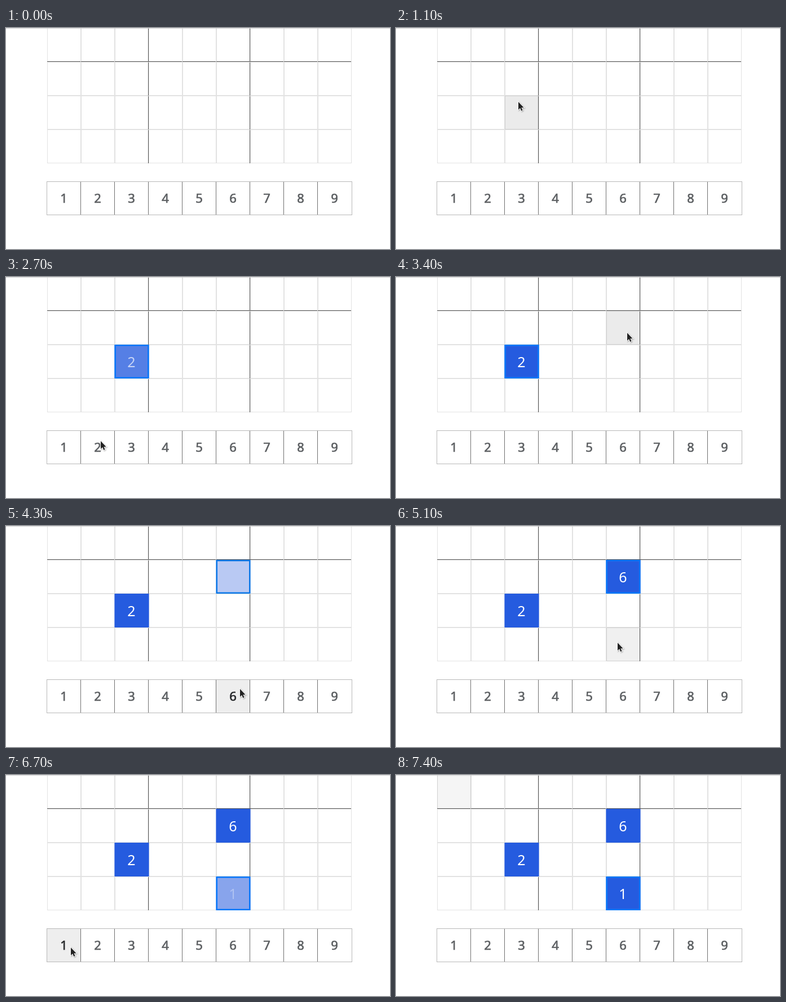
An HTML page with a canvas for the animation above (7800 ms loop, 681 by 392 pixels).

```html
<!DOCTYPE html>
<html lang="en">
<head>
<meta charset="utf-8">
<title>Number grid</title>
<style>
  html, body { margin: 0; width: 100%; height: 100%; overflow: hidden; background: #fff; }
  canvas { display: block; }
</style>
</head>
<body>
<canvas id="stage" width="681" height="392"></canvas>
<script>
const ctx = document.getElementById("stage").getContext("2d");
const LOOP = 7800, TICK = 100, SIZE = 60, LEFT = 73, PAD_TOP = 272;
const ENTER = 600, LEAVE = 7400;
const FONT = '"Noto Sans", "Open Sans", sans-serif';
const DARK = "#555", LIGHT = "#e2e2e2";
const SHADES = ["#f5f5f5", "#ebebeb", "#ebebeb", "#f0f0f0"];

// The pointer glides from stop to stop, some glides bowed sideways or down
const HOME = { x: 300, y: 0 };
const GLIDES = [
  { from: ENTER, to: 1100, x: 217, y: 130 },
  { from: 1400, to: 1700, x: 204, y: 156 },
  { from: 1800, to: 2100, x: 168, y: 290 },
  { from: 2700, to: 3400, x: 410, y: 98 },
  { from: 3700, to: 4400, x: 413, y: 293, bowX: 32 },
  { from: 4700, to: 5100, x: 393, y: 206 },
  { from: 5730, to: 6500, x: 115, y: 305, bowY: 38 },
  { from: 6800, to: LEAVE, x: 110, y: 0 }
];

const ENTRIES = [
  { digit: 2, col: 2, row: 2, focus: 1400, fill: 2600 },
  { digit: 6, col: 5, row: 1, focus: 3600, fill: 4700 },
  { digit: 1, col: 5, row: 3, focus: 5700, fill: 6700 }
];

const clamp = v => Math.max(0, Math.min(1, v));
const ramp = (t, start) => clamp((t - start + TICK) / 300);
const column = x => Math.floor((x - LEFT) / SIZE);

function pointerAt(t) {
  if (t < ENTER) return null;
  let { x, y } = HOME;
  for (const g of GLIDES) {
    const k = Math.sin(clamp((t - g.from) / (g.to - g.from)) * Math.PI / 2);
    const bow = Math.sin(k * Math.PI);
    x += (g.x - x) * k + (g.bowX || 0) * bow;
    y += (g.y - y) * k + (g.bowY || 0) * bow;
  }
  return { x, y };
}

function box(x, y, w, h, color, alpha = 1) {
  ctx.globalAlpha = alpha;
  ctx.fillStyle = color;
  ctx.fillRect(x, y, w, h);
  ctx.globalAlpha = 1;
}

function frame(x, y, w, h, line, color, alpha = 1) {
  ctx.globalAlpha = alpha;
  ctx.strokeStyle = color;
  ctx.lineWidth = line;
  ctx.strokeRect(x + line / 2, y + line / 2, w - line, h - line);
  ctx.globalAlpha = 1;
}

// A thin outline of the same colour gives a medium weight
function label(text, x, y, size, color, outline = 0, alpha = 1) {
  ctx.globalAlpha = alpha;
  ctx.font = `${size}px ${FONT}`;
  ctx.textAlign = "center";
  ctx.fillStyle = ctx.strokeStyle = color;
  ctx.fillText(text, x, y);
  if (outline) {
    ctx.lineWidth = outline;
    ctx.strokeText(text, x, y);
  }
  ctx.globalAlpha = 1;
}

function drawGrid(pointer) {
  for (let row = 0; row < 4; row++) {
    for (let col = 0; col < 9; col++) {
      const x = LEFT + col * SIZE, y = row * SIZE;
      const hover = pointer && column(pointer.x) === col && Math.floor(pointer.y / SIZE) === row;
      if (hover) box(x, y, SIZE, SIZE, SHADES[row]);
      frame(x, y, SIZE, SIZE, 1, hover ? "#d0d0d0" : LIGHT);
      if (col === 2 || col === 5) box(x + 59, y + 1, 1, 59, DARK);
      if (row === 0) box(x, 59, 59, 1, DARK);
    }
  }
}

function drawEntry({ digit, col, row, focus, fill }, i, t) {
  const x = LEFT + col * SIZE, y = row * SIZE, w = SIZE + 1;
  const next = ENTRIES[i + 1];
  const focused = ramp(t, focus), filled = ramp(t, fill);
  const blurred = next ? ramp(t, next.focus) : 0;
  box(x - 0.5, y, w, SIZE, "#b9c9f3", focused);
  box(x - 0.5, y, w, SIZE, "#255bdf", filled);
  frame(x - 0.5, y, w, SIZE, 2.5, filled ? "#0878fa" : "#0b78e8", focused * (1 - blurred));
  label(digit, x + 29.5, y + 40, 25, "#fff", 0, filled);
}

function drawPad(pointer) {
  const over = pointer && pointer.y >= PAD_TOP ? column(pointer.x) : -1;
  for (let i = 0; i < 9; i++) {
    const x = LEFT - 1 + i * SIZE;
    if (i === over) box(x, PAD_TOP, SIZE, SIZE, "#eee");
    if (i) box(x, PAD_TOP, 1, SIZE, "#707070");
    label(i + 1, x + 30.5, 310, 22, i === over ? "#26282a" : "#5c5f62", 0.7);
  }
  frame(LEFT - 1, PAD_TOP, 542, SIZE, 1, "#b8b8b8");
}

const arrow = new Path2D("M0 0V16L3.6 12.6L6 18.2L8.6 17L6.2 11.6H11Z");

function drawPointer({ x, y }) {
  ctx.save();
  ctx.translate(Math.round(x), Math.round(y) + 1);
  ctx.scale(0.88, 0.88);
  ctx.shadowColor = "rgba(0,0,0,.3)";
  ctx.shadowBlur = 2;
  ctx.shadowOffsetX = ctx.shadowOffsetY = 1;
  ctx.strokeStyle = "#fff";
  ctx.lineWidth = 2;
  ctx.stroke(arrow);
  ctx.shadowColor = "transparent";
  ctx.fillStyle = "#222";
  ctx.fill(arrow);
  ctx.restore();
}

function draw(now) {
  const t = Math.floor(now % LOOP / TICK) * TICK;
  const pointer = pointerAt(t);
  box(0, 0, 681, 392, "#fff");
  drawGrid(pointer);
  ENTRIES.forEach((entry, i) => drawEntry(entry, i, t));
  // The pad reacts one tick ahead of the pointer
  drawPad(pointerAt(t + TICK));
  box(0, 0, 681, 1, "#dcdcdc");
  box(0, 1, 681, 1, "#000", 0.05);
  if (pointer && t < LEAVE) drawPointer(pointer);
}

const start = performance.now();
function loop() {
  draw(performance.now() - start);
  requestAnimationFrame(loop);
}
loop();
</script>
</body>
</html>
```
